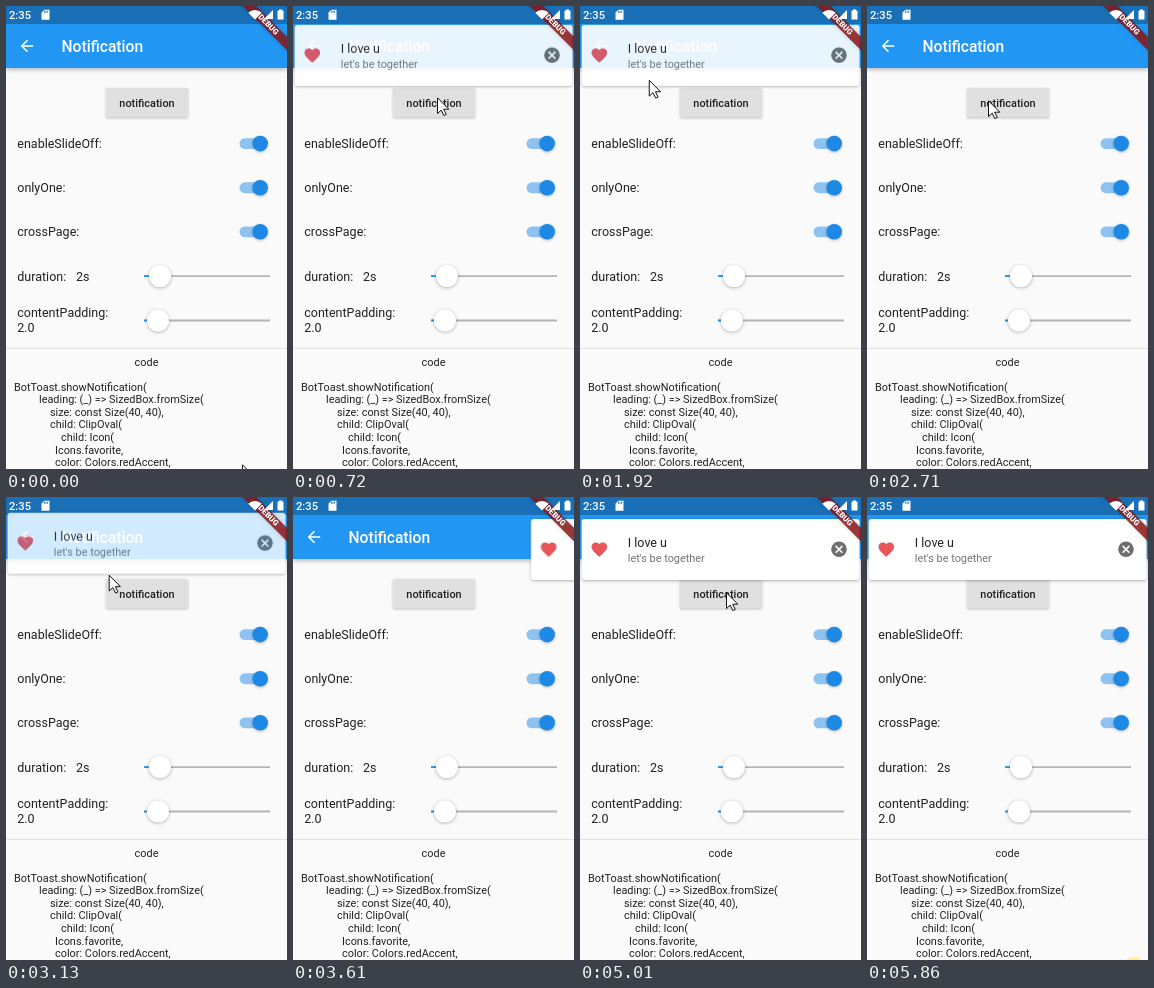
These frames come from a looping animation (281x463 px, 5890 ms). An HTML page with a canvas:

```html
<!DOCTYPE html>
<html lang="en">
<head>
<meta charset="utf-8">
<title>Notification demo</title>
<style>
html, body { margin: 0; width: 100%; height: 100%; overflow: hidden; background: #fafafa; }
canvas { display: block; width: 281px; height: 463px; }
</style>
</head>
<body>
<canvas id="stage"></canvas>
<script>
const W = 281, H = 463, LOOP = 5890, CARD_H = 100, DP = W / 360;
const ENTER = 256, SWIPE = 440;
const ratio = window.devicePixelRatio || 1;
const INK = '#212121';

// Each act: reach the button, click it, then swipe the card away.
const ACTS = [
  { reach: 470, button: [144, 91], show: 546, leave: 740, grab: 1090, grip: 190, dir: -1 },
  { reach: 1640, button: [112, 92], show: 1746, leave: 1750, grab: 2080, grip: 30, dir: 1 },
  { reach: 2690, button: [121, 94], show: 2990, leave: 3000, grab: 3282, grip: 80, dir: 1 },
  { reach: 3990, button: [146, 95], show: 4310, leave: 5030, grab: Infinity }
];
const CODE = `BotToast.showNotification(
leading: (_) => SizedBox.fromSize(
size: const Size(40, 40),
child: ClipOval(
child: Icon(
Icons.favorite,
color: Colors.redAccent,`.split('\n');
const INDENT = [8, 33, 44, 44, 55, 49, 49];

let ctx;

const clamp = v => Math.max(0, Math.min(1, v));
const progress = (t, a, b) => clamp((t - a) / (b - a));
const smooth = u => u * u * (3 - 2 * u);
const mix = (a, b, u) => a + (b - a) * u;

function surface(canvas, height) {
  canvas.width = W * ratio;
  canvas.height = height * ratio;
  const c = canvas.getContext('2d');
  c.scale(ratio, ratio);
  return c;
}

function rect(x, y, w, h, color, r = 0) {
  ctx.fillStyle = color;
  ctx.beginPath();
  ctx.roundRect(x, y, w, h, r);
  ctx.fill();
}

function disc(x, y, r, color) {
  ctx.fillStyle = color;
  ctx.beginPath();
  ctx.arc(x, y, r, 0, 7);
  ctx.fill();
}

function trace(points) {
  ctx.beginPath();
  points.forEach(([x, y]) => ctx.lineTo(x, y));
}

function poly(color, ...points) {
  trace(points);
  ctx.fillStyle = color;
  ctx.fill();
}

function line(color, width, ...points) {
  trace(points);
  ctx.strokeStyle = color;
  ctx.lineWidth = width;
  ctx.stroke();
}

function text(str, x, y, size, color = INK, weight = 400, align = 'left') {
  ctx.font = `${weight} ${size}px Roboto, Arial, sans-serif`;
  ctx.textAlign = align;
  ctx.fillStyle = color;
  ctx.fillText(str, x, y);
}

function shadowed(blur, dy, alpha, draw) {
  ctx.save();
  ctx.shadowColor = `rgba(0,0,0,${alpha})`;
  ctx.shadowBlur = blur * ratio;
  ctx.shadowOffsetY = dy * ratio;
  draw();
  ctx.restore();
}

function at(x, y, draw) {
  ctx.save();
  ctx.translate(x, y);
  draw();
  ctx.restore();
}

function drawHeart() {
  ctx.scale(DP, DP);
  ctx.beginPath();
  for (const s of [-1, 1]) {
    ctx.moveTo(0, -6.9);
    ctx.bezierCurveTo(s, -8.2, s * 2.8, -9, s * 4.5, -9);
    ctx.bezierCurveTo(s * 7.6, -9, s * 10, -6.6, s * 10, -3.5);
    ctx.bezierCurveTo(s * 10, 0.3, s * 6.6, 3.4, 0, 9.35);
  }
  ctx.fillStyle = '#e8555a';
  ctx.fill();
}

function drawClose() {
  disc(0, 0, 7.8, '#6e6e6e');
  for (const s of [-1, 1]) line('#fff', 1.55, [-3.4, -3.4 * s], [3.4, 3.4 * s]);
}

function drawBack() {
  line('#fff', 1.55, [-5, 0], [6.2, 0]);
  line('#fff', 1.55, [0.5, -5.7], [-5.2, 0], [0.5, 5.7]);
}

function drawBars() {
  shadowed(4, 1.5, 0.25, () => rect(0, 0, W, 62, '#2196f3'));
  rect(0, 0, W, 18, '#1970b6');
  at(21, 40, drawBack);
  text('Notification', 55.5, 46, 15.6, '#fff', 500);
}

function drawStatus() {
  text('2:35', 3, 13, 11.2, '#fff', 500);
  poly('#fff', [35.5, 6.5], [38.5, 3.7], [43.5, 3.7], [43.5, 13.7], [35.5, 13.7]);
  for (let i = 0; i < 3; i++) rect(38 + i * 1.6, 4.7, 0.9, 2, '#1970b6');
  ctx.beginPath();
  ctx.moveTo(249, 13.5);
  ctx.arc(249, 13.5, 9.5, -Math.PI * 0.75, -Math.PI * 0.25);
  ctx.fillStyle = '#fff';
  ctx.fill();
  poly('#fff', [258, 13], [267, 13], [267, 4]);
  rect(271.5, 4.5, 6, 9, '#fff', 0.6);
  rect(273, 3.5, 3, 1.5, '#fff');
}

function drawSwitch(y) {
  rect(233.5, y - 5.4, 26, 10.9, '#8ec3f1', 5.4);
  shadowed(3, 1, 0.25, () => disc(254.2, y, 7.8, '#1e88e5'));
}

function drawSlider(y, x) {
  rect(138, y - 0.9, 126, 1.8, '#b4b4b4');
  rect(138, y - 0.9, x - 148.5, 1.8, '#2196f3');
  shadowed(3.5, 0.8, 0.3, () => disc(x, y, 11, '#fff'));
}

function drawPage() {
  rect(0, 0, W, H, '#fafafa');
  drawBars();
  shadowed(2.5, 0.8, 0.25, () => rect(100, 82, 82, 29.5, '#e0e0e0', 1.6));
  text('notification', 141, 101, 10.9, INK, 500, 'center');
  ['enableSlideOff:', 'onlyOne:', 'crossPage:', 'duration:'].forEach((label, i) => {
    text(label, 11.3, 142 + i * 44.2, 12.5);
    if (i < 3) drawSwitch(137.6 + i * 44.1);
  });
  text('2s', 70, 274.6, 12.5);
  text('contentPadding:', 11.3, 311, 12.5);
  text('2.0', 11.3, 326, 12.5);
  drawSlider(270.1, 154);
  drawSlider(314.5, 152);
  rect(0, 342, W, 1, '#e0e0e0');
  text('code', 140.5, 359.5, 10.9, INK, 400, 'center');
  CODE.forEach((row, i) => text(row, INDENT[i], 384.5 + i * 12.65, 10.9));
}

function drawCard() {
  shadowed(3, 1, 0.3, () => rect(1.6, 22, 278, 61, '#fff', 3));
  at(19.3, 52.5, drawHeart);
  at(259, 52.3, drawClose);
  text('I love u', 47.8, 50, 12.5);
  text("let's be together", 47.8, 65, 10.9, '#757575');
}

function drawToast(t, { show, grab, dir = 1 }) {
  if (t < show || t >= grab + SWIPE) return;
  const rest = (1 - progress(t, show, show + ENTER)) ** 2;
  const slide = t < grab ? 0 : dir * W * smooth(progress(t, grab, grab + SWIPE));
  ctx.save();
  ctx.globalAlpha = 1 - rest;
  ctx.drawImage(card, slide, -40 * DP * rest, W, CARD_H);
  ctx.restore();
}

function drawBanner() {
  at(W, 0, () => {
    ctx.rotate(Math.PI / 4);
    const band = color => rect(-40, 28 * DP, 80, 12 * DP, color);
    shadowed(4, 0, 0.4, () => band('rgba(0,0,0,.5)'));
    band('rgba(183,28,28,.63)');
    text('DEBUG', 0, 36.9 * DP, 7.9, '#fff', 900, 'center');
  });
}

function buildPath() {
  const stops = [[0, 236, 458]];
  for (const { reach, button, leave, grab, grip, dir } of ACTS) {
    stops.push([reach, ...button], [leave, ...button]);
    if (grip) stops.push([grab, grip, 57], [grab + SWIPE, grip + dir * W, 57]);
  }
  stops.push([5630, 267, 472], [LOOP, 267, 472]);
  return stops;
}

function pointerAt(t) {
  const i = path.findIndex(stop => stop[0] > t);
  const [a, ax, ay] = path[i - 1], [b, bx, by] = path[i];
  const u = smooth(progress(t, a, b));
  return [mix(ax, bx, u), mix(ay, by, u)];
}

function isPressed(t) {
  const within = (from, length) => t >= from && t < from + length;
  return t > 5740 || ACTS.some(a => within(a.show - 140, 140) || within(a.grab, SWIPE * 0.8));
}

function drawPointer(t) {
  at(...pointerAt(t), () => {
    if (isPressed(t)) disc(0, 0, 12, 'rgba(255,235,59,.6)');
    poly('#fff', [0.5, 0.8], [0.5, 16.6], [4.2, 13.1], [6.9, 18.6], [9.3, 17.5], [6.7, 12.2], [11.8, 12.2]);
    ctx.closePath();
    ctx.strokeStyle = '#111';
    ctx.lineWidth = 1;
    ctx.stroke();
  });
}

function frame(t) {
  drawPage();
  ACTS.forEach(act => drawToast(t, act));
  drawBanner();
  drawStatus();
  drawPointer(t);
}

const path = buildPath();
const card = document.createElement('canvas');
ctx = surface(card, CARD_H);
drawCard();
ctx = surface(document.getElementById('stage'), H);

const start = performance.now();
function tick() {
  frame((performance.now() - start) % LOOP);
  requestAnimationFrame(tick);
}
tick();
</script>
</body>
</html>
```
